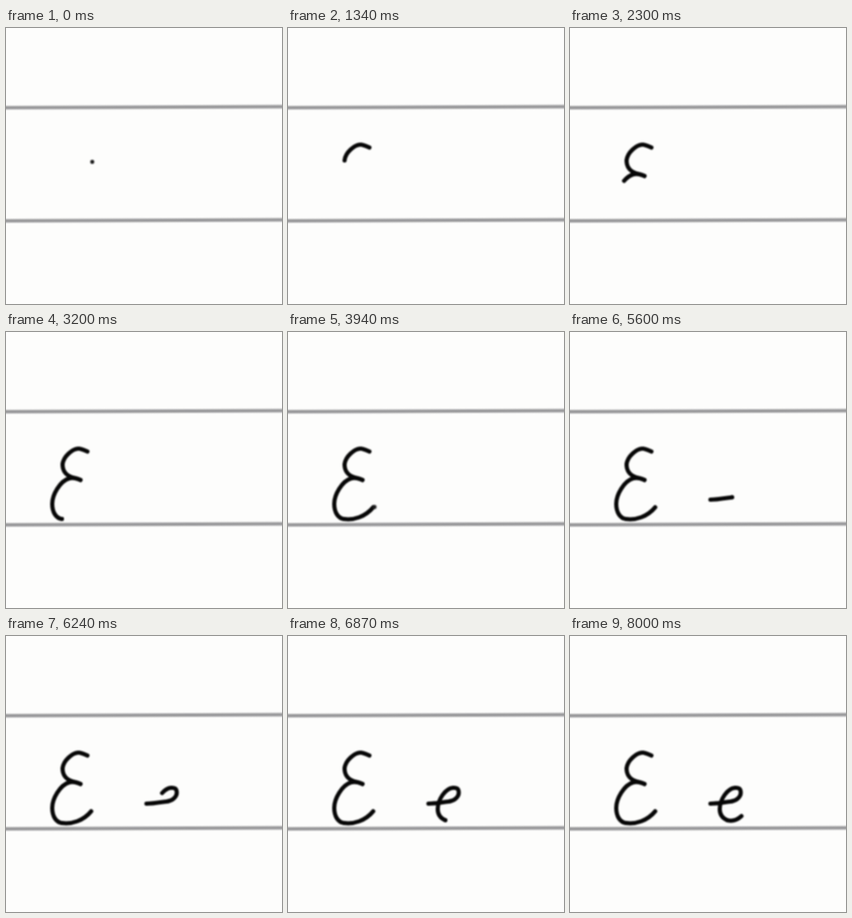
Recreate the animation shown at these times as an HTML page. Size 400 by 400 pixels, loop 8.03 s.

```html
<!DOCTYPE html>
<html lang="en">
<head>
<meta charset="utf-8">
<title>Handwriting the letter E</title>
<style>
  html, body { margin: 0; width: 100%; height: 100%; overflow: hidden; background: #fdfdfc; }
  svg { display: block; width: 100vw; height: 100vh; }

  .rules { fill: none; stroke: #98989a; stroke-width: 5; filter: blur(1.1px); }
  .ink { filter: blur(1px); }
  .ink path {
    fill: none; stroke: #060606; stroke-width: 6;
    stroke-linecap: round; stroke-linejoin: round;
    stroke-dasharray: 1 3; stroke-dashoffset: 1.2;
    animation: 8.03s linear infinite;
  }
  .pen { fill: #1c1c1c; animation: hover 8.03s linear infinite; }

  /* An offset of 1.2 hides the round cap before a stroke begins. */
  .ink .top    { animation-name: top; }
  .ink .waist  { animation-name: waist; }
  .ink .bowl   { animation-name: bowl; }
  .ink .tail   { animation-name: tail; }
  .ink .bar    { animation-name: bar; }
  .ink .loop   { animation-name: loop; }
  .ink .finish { animation-name: finish; }

  @keyframes top    { 0%, 7.72%  { stroke-dashoffset: 1.2 } 7.73%  { stroke-dashoffset: 1 } 16.69%, 100% { stroke-dashoffset: 0 } }
  @keyframes waist  { 0%, 16.69% { stroke-dashoffset: 1.2 } 16.7%  { stroke-dashoffset: 1 } 22.29%, 100% { stroke-dashoffset: 0 } }
  @keyframes bowl   { 0%, 22.29% { stroke-dashoffset: 1.2 } 22.3%  { stroke-dashoffset: 1 } 39.85%, 100% { stroke-dashoffset: 0 } }
  @keyframes tail   { 0%, 39.85% { stroke-dashoffset: 1.2 } 39.86% { stroke-dashoffset: 1 } 48.82%, 100% { stroke-dashoffset: 0 } }
  @keyframes bar    { 0%, 63.51% { stroke-dashoffset: 1.2 } 63.52% { stroke-dashoffset: 1 } 69.74%, 100% { stroke-dashoffset: 0 } }
  @keyframes loop   { 0%, 69.74% { stroke-dashoffset: 1.2 } 69.75% { stroke-dashoffset: 1 } 85.55%, 100% { stroke-dashoffset: 0 } }
  @keyframes finish { 0%, 85.55% { stroke-dashoffset: 1.2 } 85.56% { stroke-dashoffset: 1 } 90.16%, 100% { stroke-dashoffset: 0 } }

  /* The pen tip shows only while it moves between strokes. */
  @keyframes hover {
    0%, .5% { transform: translate(125px, 194px); opacity: 1 }
    7.72%   { transform: translate(118px, 173px); opacity: 1 }
    7.73%   { transform: translate(118px, 173px); opacity: 0 }
    48.81%  { transform: translate(123px, 254px); opacity: 0 }
    48.82%  { transform: translate(123px, 254px); opacity: 1 }
    57.29%  { transform: translate(202px, 240px); opacity: 1 }
    63.51%  { transform: translate(203px, 243px); opacity: 1 }
    63.52%  { transform: translate(203px, 243px); opacity: 0 }
    90.15%  { transform: translate(249px, 261px); opacity: 0 }
    90.16%  { transform: translate(249px, 261px); opacity: 1 }
    94.27%  { transform: translate(262px, 333px); opacity: 1 }
    99.6%   { transform: translate(274px, 402px); opacity: 1 }
    99.61%, 100% { transform: translate(274px, 402px); opacity: 0 }
  }
</style>
</head>
<body>
<svg viewBox="0 0 400 400">
  <path class="rules" d="M-9 115.6L409 113.9M-9 279.5L409 278"/>
  <g class="ink">
    <path class="top" pathLength="1" d="M118 173.3C113 171 109 169 105 169C97 169 83 180 82 192"/>
    <path class="waist" pathLength="1" d="M82 192C82 203 88 208 97 211C101 212 105 213 108 214.5"/>
    <path class="bowl" pathLength="1" d="M108 214.5C104 212 97 211 92 212C78 216 67 236 67 249C67 262 73 270 81 271"/>
    <path class="tail" pathLength="1" d="M81 271C95 273 112 268 123.5 254"/>
    <path class="bar" pathLength="1" d="M203.5 243C213 243 224 241 235 239.5"/>
    <path class="loop" pathLength="1" d="M235 239.5C243 238 247.5 232 247.5 227C247.5 221 244 219.5 239 220C228 221 217 237 217 251C217 259 221 264 228 267"/>
    <path class="finish" pathLength="1" d="M228 267C236 269 243 266 248.5 261"/>
    <circle class="pen" r="2.9"/>
  </g>
</svg>
</body>
</html>
```
